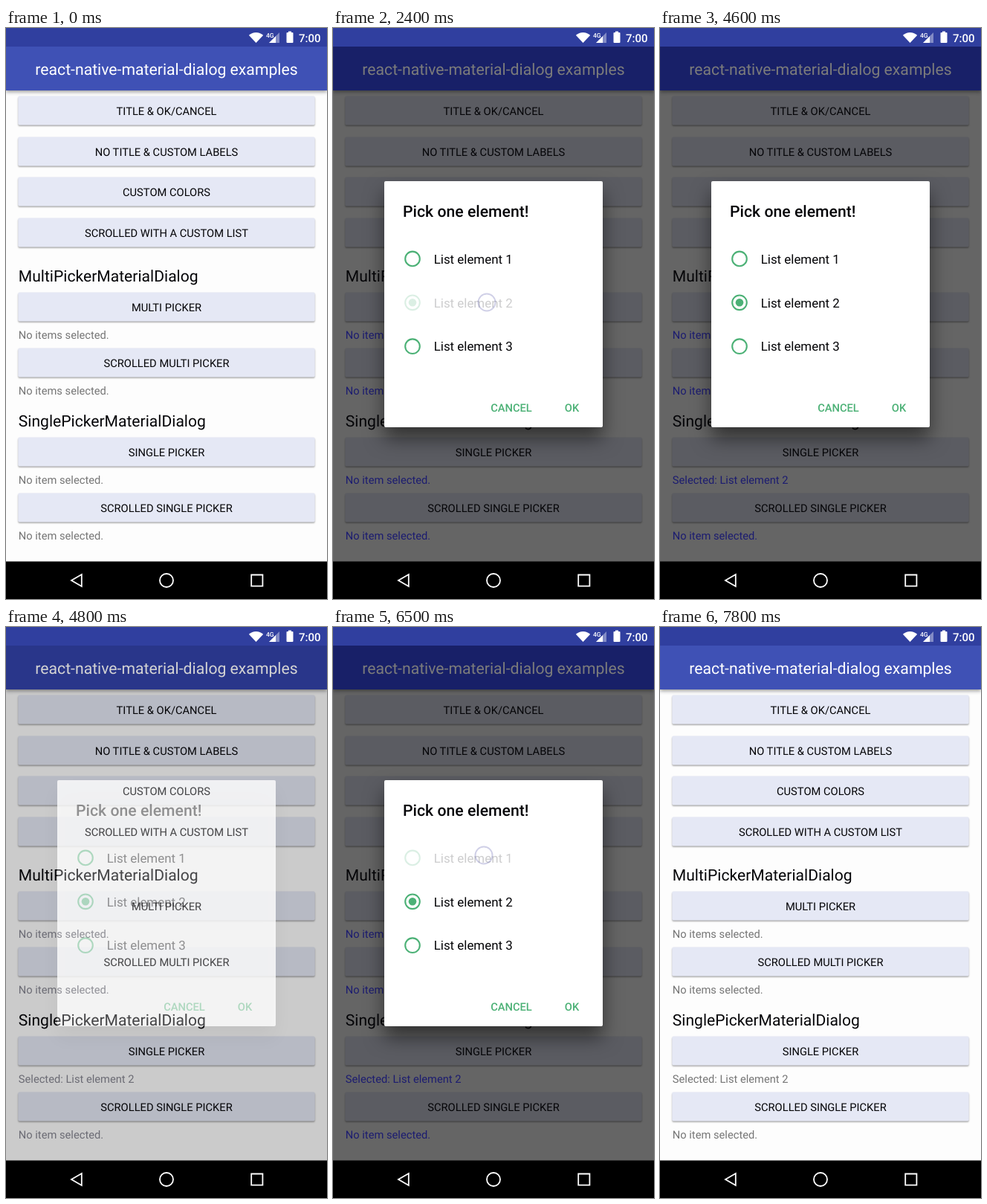
These frames come from a looping animation (432 px wide and 768 px high, 8 s). An HTML page with a canvas:

```html
<!DOCTYPE html>
<html lang="en">
<head>
<meta charset="utf-8">
<title>Dialog examples</title>
<style>
  html, body { margin: 0; width: 100%; height: 100%; overflow: hidden; background: #000; }
  canvas { display: block; width: 432px; height: 768px; }
</style>
</head>
<body>
<canvas width="432" height="768"></canvas>
<script>
const g = document.querySelector('canvas').getContext('2d');
const LOOP = 8000, STEP = 100;
const GREEN = '#4cb176', INK = '#050508';
const PAD = 16.8;

const buttons = [
  ['TITLE & OK/CANCEL', 91], ['NO TITLE & CUSTOM LABELS', 146],
  ['CUSTOM COLORS', 200], ['SCROLLED WITH A CUSTOM LIST', 255],
  ['MULTI PICKER', 355], ['SCROLLED MULTI PICKER', 430],
  ['SINGLE PICKER', 550], ['SCROLLED SINGLE PICKER', 625]
];

// Each tap is fully pressed from `down` to `up`
const taps = [
  { down: 600, up: 700, x: 130, y: 570, on: 'open' },
  { down: 2400, up: 2400, x: 207, y: 369, on: 2 },
  { down: 2900, up: 3000, x: 203, y: 428, on: 3 },
  { down: 3700, up: 3800, x: 198, y: 369, on: 2 },
  { down: 4100, up: 4200, x: 322, y: 508, on: 'OK' },
  { down: 5400, up: 5500, x: 130, y: 570, on: 'open' },
  { down: 6500, up: 6600, x: 203, y: 307, on: 1 },
  { down: 7200, up: 7200, x: 243, y: 510, on: 'CANCEL' }
];

const ramp = (t, a, b) => Math.min(1, Math.max(0, (t - a) / (b - a)));
const mix = (a, b, k) => `rgb(${a.map((v, i) => Math.round(v + (b[i] - v) * k))})`;
const pressure = (t, p) => Math.min(ramp(t, p.down - 150, p.down), 1 - ramp(t, p.up, p.up + 200));
const pressOn = (t, on) => Math.max(0, ...taps.filter(p => p.on === on).map(p => pressure(t, p)));

function text(s, x, y, size, color, align = 'left', weight = 400) {
  g.font = `${weight} ${size}px Roboto, sans-serif`;
  g.textRendering = 'geometricPrecision';
  g.textAlign = align;
  g.fillStyle = color;
  g.fillText(s, x, y);
}

function box(x, y, w, h, color, r = 0) {
  g.fillStyle = color;
  g.beginPath();
  g.roundRect(x, y, w, h, r);
  g.fill();
}

function shadow(color, blur, dy) {
  g.shadowColor = color;
  g.shadowBlur = blur;
  g.shadowOffsetY = dy;
}

function circle(x, y, r, color, line) {
  g.beginPath();
  g.arc(x, y, r, 0, 7);
  g.fillStyle = g.strokeStyle = color;
  g.lineWidth = line;
  line ? g.stroke() : g.fill();
}

function poly(points, line) {
  g.beginPath();
  points.forEach(p => g.lineTo(...p));
  g.closePath();
  g.fillStyle = g.strokeStyle = '#fff';
  g.lineWidth = line;
  line ? g.stroke() : g.fill();
}

function pageTexts(dim, picked) {
  for (const [label, y] of buttons) text(label, 216, y + 26, 14.7, INK, 'center');
  text('MultiPickerMaterialDialog', PAD, 341, 21.1, INK);
  text('SinglePickerMaterialDialog', PAD, 536, 21.1, INK);
  const note = mix([117, 117, 117], [28, 28, 112], dim);
  text('No items selected.', PAD, 418, 14.7, note);
  text('No items selected.', PAD, 493, 14.7, note);
  text(picked ? 'Selected: List element 2' : 'No item selected.', PAD, 613, 14.7, note);
  text('No item selected.', PAD, 688, 14.7, note);
}

function ripple(t) {
  const p = taps.find(p => p.on === 'open' && t >= p.down - 100 && t < p.down + 700);
  if (!p) return;
  const age = t - p.down + 100;
  g.save();
  g.beginPath();
  g.rect(16, 550.5, 400, 39);
  g.clip();
  circle(p.x, p.y, 5 + 28 * ramp(age, 0, 600), `rgba(0,0,0,${0.18 * (1 - ramp(age, 400, 800))})`);
  g.restore();
}

function page(t, dim, picked) {
  box(0, 0, 432, 768, '#fdfdfd');
  for (const [, y] of buttons) {
    shadow('rgba(0,0,0,.33)', 2, 1.5);
    box(16.3, y + .5, 399.4, 39, '#e5e8f5', 2);
    shadow('transparent', 0, 0);
  }
  ripple(t);
  box(0, 84, 432, 634, `rgba(0,0,0,${0.6 * dim})`);
  pageTexts(dim * dim, picked);

  shadow('rgba(0,0,0,.4)', 5, 2);
  box(0, 25, 432, 59, mix([24, 32, 104], [63, 81, 181], (1 - dim) ** 2));
  shadow('transparent', 0, 0);
  const gray = 255 - 132 * dim;
  text('react-native-material-dialog examples', 216, 63, 21.2, `rgb(${gray},${gray},${gray})`, 'center');
}

function dialog(t, k, choice, picked) {
  if (!k) return;
  g.save();
  g.globalAlpha = 1 - (1 - k) ** 4;
  shadow(`rgba(0,0,0,${0.5 * k * k})`, 26, 15);
  box(69, 206, 294, 331, '#fff', 2);
  shadow('transparent', 0, 0);
  g.beginPath();
  g.rect(69, 206, 294, 331);
  g.clip();
  g.globalAlpha = 1 - k;
  pageTexts(k * k, picked);

  const shown = k ** 0.8;
  g.globalAlpha = shown;
  text('Pick one element!', 94, 253.5, 21.2, INK, 'left', 500);
  for (let i = 1; i <= 3; i++) {
    const y = 251.5 + 58.9 * i;
    g.globalAlpha = shown * (1 - 0.8 * pressOn(t, i));
    circle(107, y, 9.8, GREEN, 2.1);
    if (i === choice) circle(107, y, 5.3, GREEN);
    text('List element ' + i, 135.7, y + 6.2, 16.9, INK);
  }
  for (const [label, x] of [['CANCEL', 240], ['OK', 321.5]]) {
    g.globalAlpha = shown * (1 - 0.7 * pressOn(t, label));
    text(label, x, 515.5, 14.7, GREEN, 'center', 500);
  }
  g.restore();
}

function systemBars() {
  box(0, 0, 432, 25, '#303f9f');
  g.fillStyle = '#fff';
  g.beginPath();
  g.moveTo(336.5, 20);
  g.arc(336.5, 20, 14, -2.33, -0.81);
  g.fill();
  text('4G', 350, 13, 8.5, '#fff', 'left', 500);
  g.globalAlpha = 0.4;
  poly([[354, 20], [368, 20], [368, 6]]);
  g.globalAlpha = 1;
  poly([[354, 20], [363, 20], [363, 11]]);
  box(377.5, 6, 9, 14, '#fff', 1);
  box(380, 4.5, 4, 2, '#fff');
  text('7:00', 394, 18.5, 15, '#fff', 'left', 500);

  box(0, 717.6, 432, 51, '#000');
  poly([[88, 743], [101.8, 735], [101.8, 751]], 1.8);
  circle(216, 743, 9, '#fff', 1.8);
  poly([[330.2, 735.5], [345.4, 735.5], [345.4, 750.7], [330.2, 750.7]], 1.8);
}

function draw(t) {
  const k = ramp(t, 1000, 1300) - ramp(t, 4600, 4900) + ramp(t, 5800, 6100) - ramp(t, 7500, 7800);
  const choice = taps.reduce((c, p) => p.on > 0 && t >= p.up ? p.on : c, 0);
  const picked = t >= 4500;
  page(t, k, picked);
  dialog(t, k, choice, picked);
  for (const p of taps) {
    const a = pressure(t, p);
    if (a) circle(p.x, p.y, 11.5, `rgba(110,110,180,${0.32 * a})`, 2);
  }
  systemBars();
}

const start = performance.now();
function tick() {
  const t = (performance.now() - start) % LOOP;
  draw(Math.floor(t / STEP) * STEP);
  requestAnimationFrame(tick);
}
tick();
</script>
</body>
</html>
```
